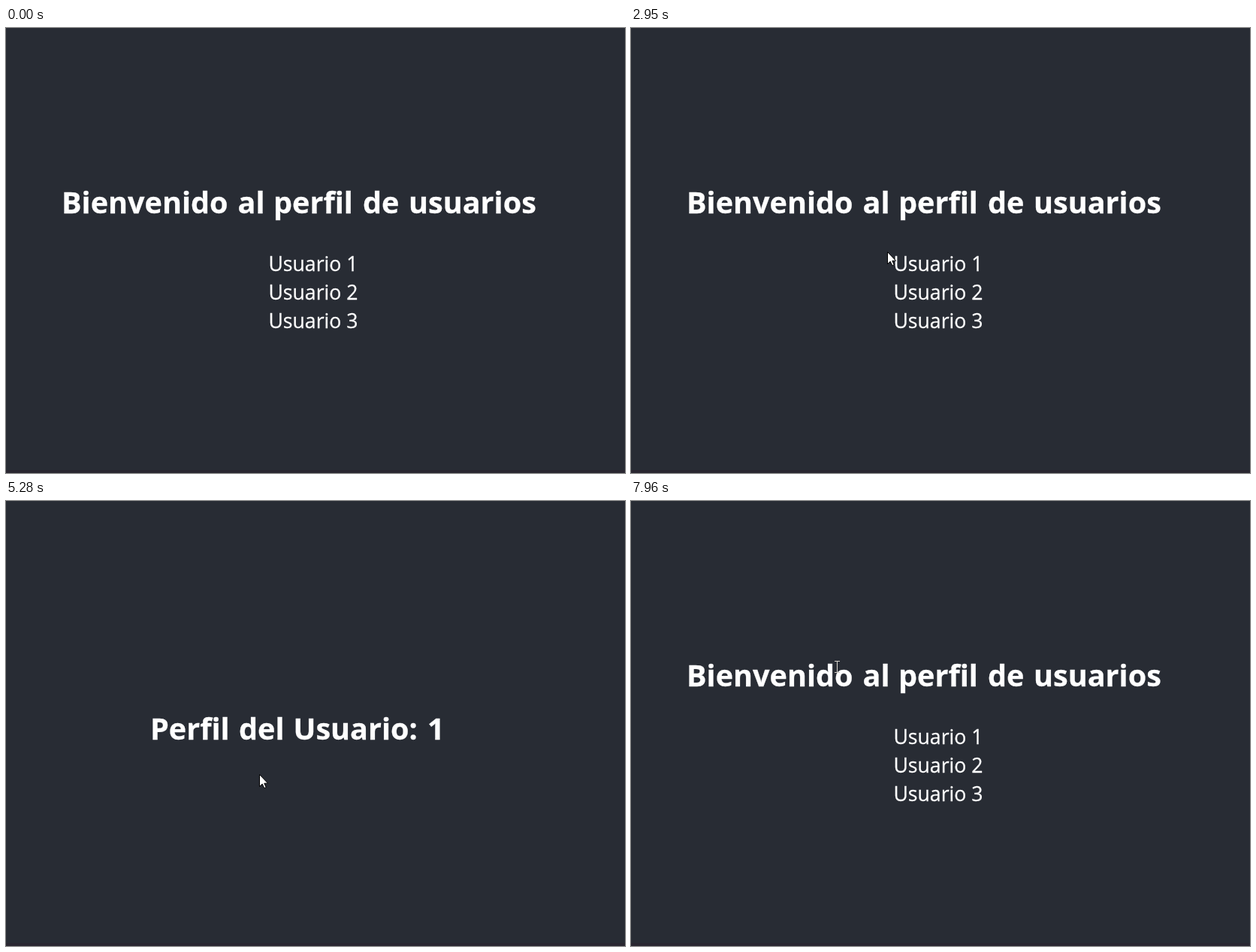
These frames come from a looping animation (824 px wide and 593 px high, 8000 ms). An HTML page:

```html
<!DOCTYPE html>
<html lang="es">
<head>
<meta charset="utf-8">
<title>Perfil de usuarios</title>
<style>
  html, body { margin: 0; width: 100%; height: 100%; overflow: hidden; background: #282c34; }
  svg { display: block; }
  text {
    font: 26.6px "Open Sans", "Noto Sans", sans-serif;
    fill: #fff; stroke: #fff; stroke-width: .3px; white-space: pre;
  }
  .title { font-size: 39.6px; font-weight: 700; }

  /* Parts switch on and off hard; only the pointer glides */
  #home, #profile, #click, #pointer, #arrow, #beam { animation: 8s step-end infinite; }
  #home { animation-name: home; }
  #profile { animation-name: profile; }
  #click { animation-name: click; }
  #arrow { animation-name: arrow; }
  #beam { animation-name: beam; }
  #pointer { animation: shown 8s step-end infinite, move 8s linear infinite; }

  @keyframes home { 0%, 94.625% { opacity: 1; } 58.75% { opacity: 0; } }
  @keyframes profile { 0%, 94.625% { opacity: 0; } 58.75% { opacity: 1; } }
  @keyframes click { 0%, 58.75% { opacity: 0; } 55.875% { opacity: .5; } }
  @keyframes shown { 0%, 86% { opacity: 0; } 3.125%, 95.5% { opacity: 1; } }

  /* The arrow turns into a text beam over the titles */
  @keyframes arrow { 0%, 62%, 77.5% { opacity: 1; } 58.75%, 71.4%, 99% { opacity: 0; } }
  @keyframes beam { 0%, 62%, 77.5% { opacity: 0; } 58.75%, 71.4%, 99% { opacity: 1; } }

  @keyframes move {
    0%, 3% { transform: translate(784px, 580px); }
    12.6% { transform: translate(717px, 381px); }
    22.5% { transform: translate(406px, 286px); }
    34% { transform: translate(342px, 292px); }
    36.8%, 38.1% { transform: translate(341px, 298px); }
    45% { transform: translate(361px, 310px); }
    50.5%, 58.75% { transform: translate(374px, 308px); }
    66%, 67.2% { transform: translate(337px, 364px); }
    75.4%, 76.6% { transform: translate(378px, 303px); }
    86% { transform: translate(0, 0); }
    95.5% { transform: translate(150px, 54px); }
    99.5%, 100% { transform: translate(274px, 221px); }
  }
</style>
</head>
<body>
<svg width="824" height="593" viewBox="0 0 824 593">
  <rect width="824" height="593" fill="#282c34"/>
  <rect y="589" width="824" height="4" fill="#2a2731"/>

  <g id="home">
    <text class="title" y="247"><tspan x="74">Bienvenido</tspan> <tspan x="308.5">al</tspan> <tspan x="356">perfil</tspan> <tspan x="475">de</tspan> <tspan x="536">usuarios</tspan></text>
    <text x="349.5" y="324">Usuario 1</text>
    <text x="349.5" y="362">Usuario 2</text>
    <text x="349.5" y="400">Usuario 3</text>
  </g>

  <g id="profile">
    <text class="title" y="318"><tspan x="192">Perfil</tspan> <tspan x="310">del</tspan> <tspan x="382.5">Usuario:</tspan> <tspan x="561">1</tspan></text>
  </g>

  <g id="pointer">
    <path id="arrow" d="M.5 .5V16.5L4.2 13.1 6.8 18.6 9.2 17.6 6.8 12.2H11.6Z" fill="#fff" stroke="#000"/>
    <path id="beam" d="M-3 -7.5H4M.5 -7.5V7.5M-3 7.5H4" fill="none" stroke="#d7d3cb"/>
  </g>
  <circle id="click" cx="374" cy="308" r="12" fill="#ff0"/>
</svg>
</body>
</html>
```
